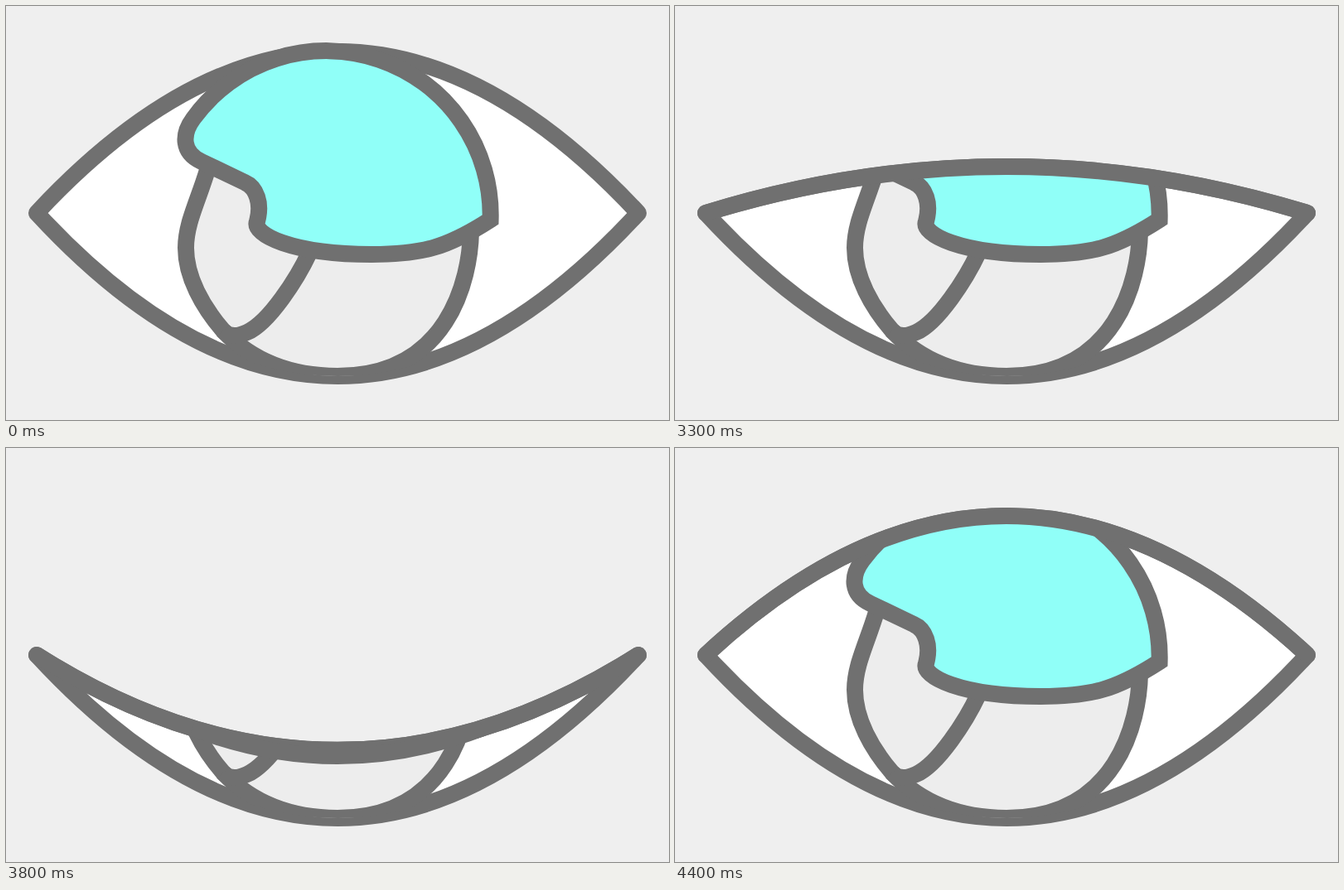
Animation of 800 by 500 pixels, one loop 4.5 s. Source, as an HTML page:

```html
<!DOCTYPE html>
<html lang="en">
<head>
<meta charset="utf-8">
<title>Blinking eye</title>
<style>
  html, body { margin: 0; width: 100%; height: 100%; overflow: hidden; background: #efefef; }
  svg { display: block; width: 100%; height: 100%; }
  .line { fill: none; stroke: #707070; stroke-width: 20; }
</style>
</head>
<body>
<svg viewBox="0 0 800 500">
  <defs>
    <clipPath id="opening"><path id="clipShape"/></clipPath>
  </defs>
  <rect width="800" height="500" fill="#efefef"/>
  <path id="white" fill="#fff"/>
  <path id="outline" class="line" stroke-linejoin="round"/>
  <g clip-path="url(#opening)">
    <!-- iris -->
    <path class="line" style="fill:#ededed" d="M243 198 C232 235 217 262 217 292 C217 327 237 363 262 392
      C300 432 350 447 400 447 C533 447 560 331 561 272"/>
    <!-- left facet -->
    <path class="line" d="M262 392 C268 399 278 400 291 394 C318 382 352 328 366 298"/>
    <!-- cyan cap -->
    <path class="line" style="fill:#90fff8" stroke-linejoin="miter" d="M584.6 258 A198.2 198.2 0 0 0 226 136
      C212 155 212 177 236 188 L288 213 C302 219 309 238 303 260
      C297 276 345 300 441 300 C502 300 532 292 584.6 258 Z"/>
  </g>
  <path id="lid" class="line" stroke-linecap="round"/>
  <path id="fold" class="line"/>
</svg>
<script>
  const LOOP = 4500, HOLD = 3000, STEP = 100, CLOSED = 8;
  const LID_Y = [55, 82, 115, 149, 194, 250, 307, 365, 447]; // lid apex, open to closed
  const FOLD = { 6: 3, 7: 7 };                               // extra sag over the iris
  const set = (id, d) => document.getElementById(id).setAttribute('d', d);

  // Parabola through both eye corners with its apex at y
  const lidPath = y => `M37 250 Q400 ${2 * y - 250} 763 250`;
  const eyePath = y => lidPath(y) + ' Q400 644 37 250 Z';

  function foldPath(y, sag) {
    if (!sag) return '';
    const end = y + (250 - y) * (175 / 363) ** 2;
    return `M225 ${end} Q400 ${2 * (y + sag) - end} 575 ${end}`;
  }

  function draw(time) {
    const t = time % LOOP;
    const n = t < HOLD ? 0 : Math.floor((t - HOLD) / STEP) + 1;
    const level = CLOSED - Math.abs(CLOSED - n);
    const y = LID_Y[level];
    set('white', eyePath(y));
    set('outline', eyePath(y));
    set('clipShape', eyePath(level ? y : 0)); // the cap rises over the open lid
    set('lid', level ? lidPath(y) : '');
    set('fold', foldPath(y, FOLD[level]));
  }

  let start = null;
  function tick(now) {
    if (start === null) start = now;
    draw(now - start);
    requestAnimationFrame(tick);
  }
  draw(0);
  requestAnimationFrame(tick);
</script>
</body>
</html>
```
